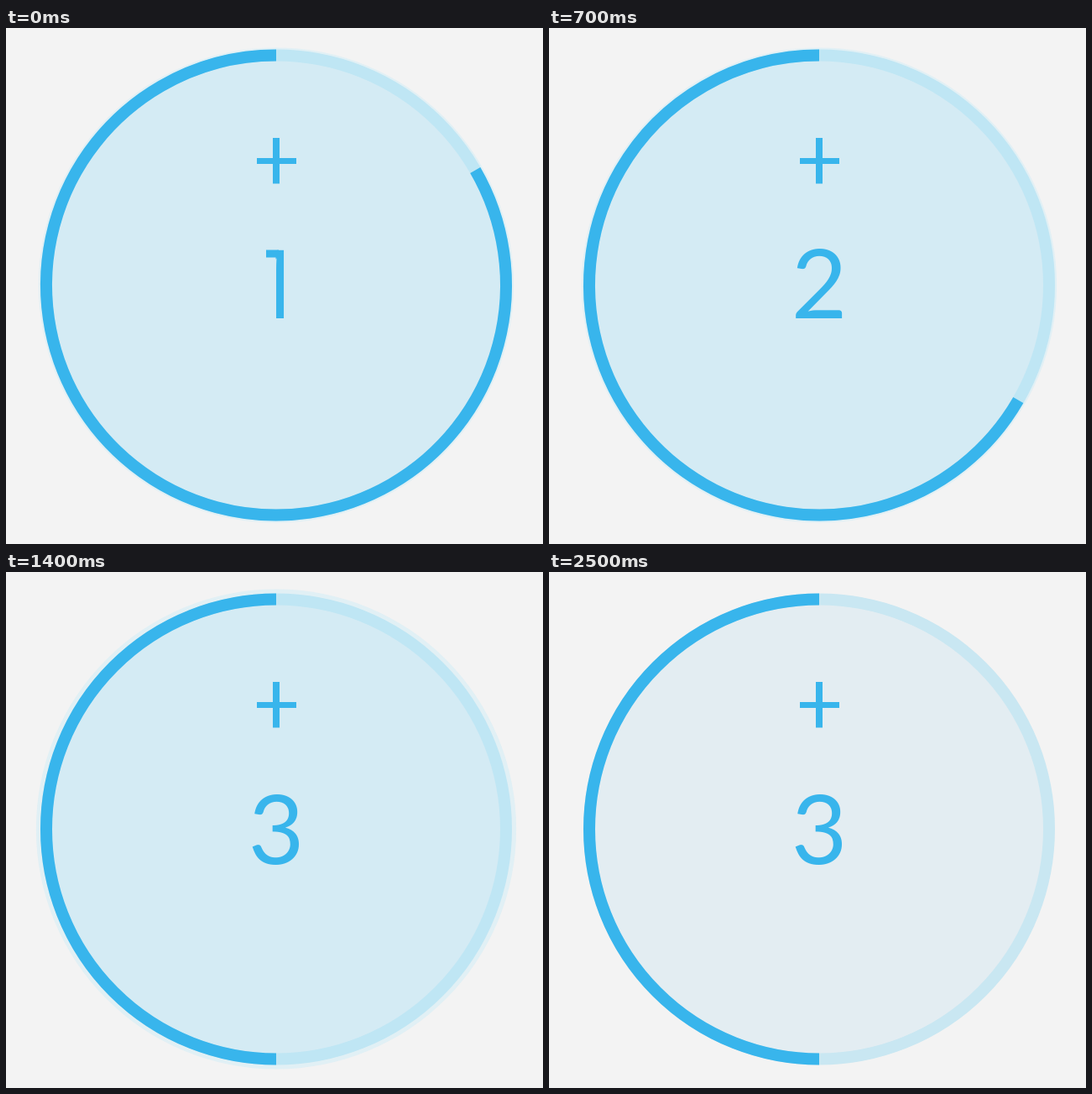
These frames come from a looping animation (640x615 px, 2600 ms). An HTML page with a canvas:

```html
<!DOCTYPE html>
<html lang="en">
<head>
<meta charset="utf-8">
<title>Tap counter</title>
<style>
  html, body { margin: 0; width: 100%; height: 100%; overflow: hidden; background: #f3f3f3; }
  canvas { display: block; }
</style>
</head>
<body>
<canvas id="stage" width="640" height="615"></canvas>
<script>
const ctx = document.getElementById('stage').getContext('2d');
const LOOP = 2600, CX = 322, CY = 306.5, BLUE = '#38b5ec';

// When each tap lands, and where the pointer is
const taps = [
  { at: -400, x: 322, y: 376 },
  { at: 300, x: 317, y: 380 },
  { at: 1020, x: 324, y: 374 }
];

const ramp = (t, a, b) => Math.min(1, Math.max(0, (t - a) / (b - a)));
const mix = (a, b, k) => a + (b - a) * k;

function disc(x, y, r, fill) {
  ctx.beginPath();
  ctx.arc(x, y, r, 0, Math.PI * 2);
  ctx.fillStyle = fill;
  ctx.fill();
}

function arc(from, to, color) {
  ctx.beginPath();
  ctx.arc(CX, CY, 274, (from - 90) * Math.PI / 180, (to - 90) * Math.PI / 180);
  ctx.lineWidth = 14;
  ctx.strokeStyle = color;
  ctx.stroke();
}

function zoom(s, y, draw) {
  ctx.save();
  ctx.translate(CX, y);
  ctx.scale(s, s);
  ctx.translate(-CX, -y);
  draw();
  ctx.restore();
}

function digit(n, alpha) {
  ctx.save();
  ctx.globalAlpha = alpha;
  ctx.fillStyle = BLUE;
  ctx.textAlign = 'center';
  if (n === 1) {
    // Bare stem with a flat flag
    ctx.beginPath();
    ctx.rect(310, 264.5, 12, 9);
    ctx.rect(322, 264.5, 3, 9);
    ctx.fill();
    ctx.beginPath();
    ctx.rect(321.5, 260, 20, 100);
    ctx.clip();
    ctx.font = '400 114px "Open Sans", sans-serif';
    ctx.fillText('1', 323.8, 346);
  } else {
    ctx.font = '400 115px Lato, sans-serif';
    ctx.fillText(n, 322, n === 2 ? 346 : 348);
  }
  ctx.restore();
}

function ripple(u) {
  const r = Math.min(287, Math.max(0, (u - 22) * 2.1)) - 6 * ramp(u, 375, 415);
  const k = ramp(u, 120, 220);
  const alpha = mix(.17, .2, k) * (1 - ramp(u, 410, 650));
  disc(CX, CY, r, `rgba(${mix(180, 150, k)},${mix(243, 226, k)},${mix(212, 247, k)},${alpha})`);
}

function pointer(tap, u) {
  ctx.globalAlpha = ramp(u, 0, 60) * (1 - ramp(u, 110, 200));
  disc(tap.x, tap.y, 20, '#e4edf3');
  ctx.lineWidth = 2;
  ctx.strokeStyle = '#cfe2f0';
  ctx.stroke();
  ctx.globalAlpha = 1;
}

function draw(t) {
  const n = taps.filter(tap => tap.at <= t).length;
  const tap = taps[n - 1], u = t - tap.at;
  const swell = 1 + .0585 * (ramp(u, 0, 104) - ramp(u, 104, 185));
  const shrink = 1 - .35 * (ramp(u, 26, 108) - ramp(u, 108, 210));

  ctx.fillStyle = '#f3f3f3';
  ctx.fillRect(0, 0, 640, 615);

  zoom(swell, CY, () => {
    disc(CX, CY, 274, '#e3edf2');
    arc(0, 360, '#c9e7f2');
  });
  ripple(u);
  zoom(swell, CY, () => {
    arc(60 * n, 360, BLUE);
    ctx.fillStyle = BLUE;
    ctx.fillRect(318, 131, 8, 54.5);
    ctx.fillRect(299, 155, 47, 7);
  });
  zoom(shrink, 305, () => {
    if (n > 1) digit(n - 1, 1 - ramp(u, 80, 140));
    digit(n, n > 1 ? ramp(u, 40, 90) : 1);
  });
  pointer(tap, u);
}

const start = performance.now();
function tick() {
  draw((performance.now() - start) % LOOP);
  requestAnimationFrame(tick);
}
tick();
</script>
</body>
</html>
```
